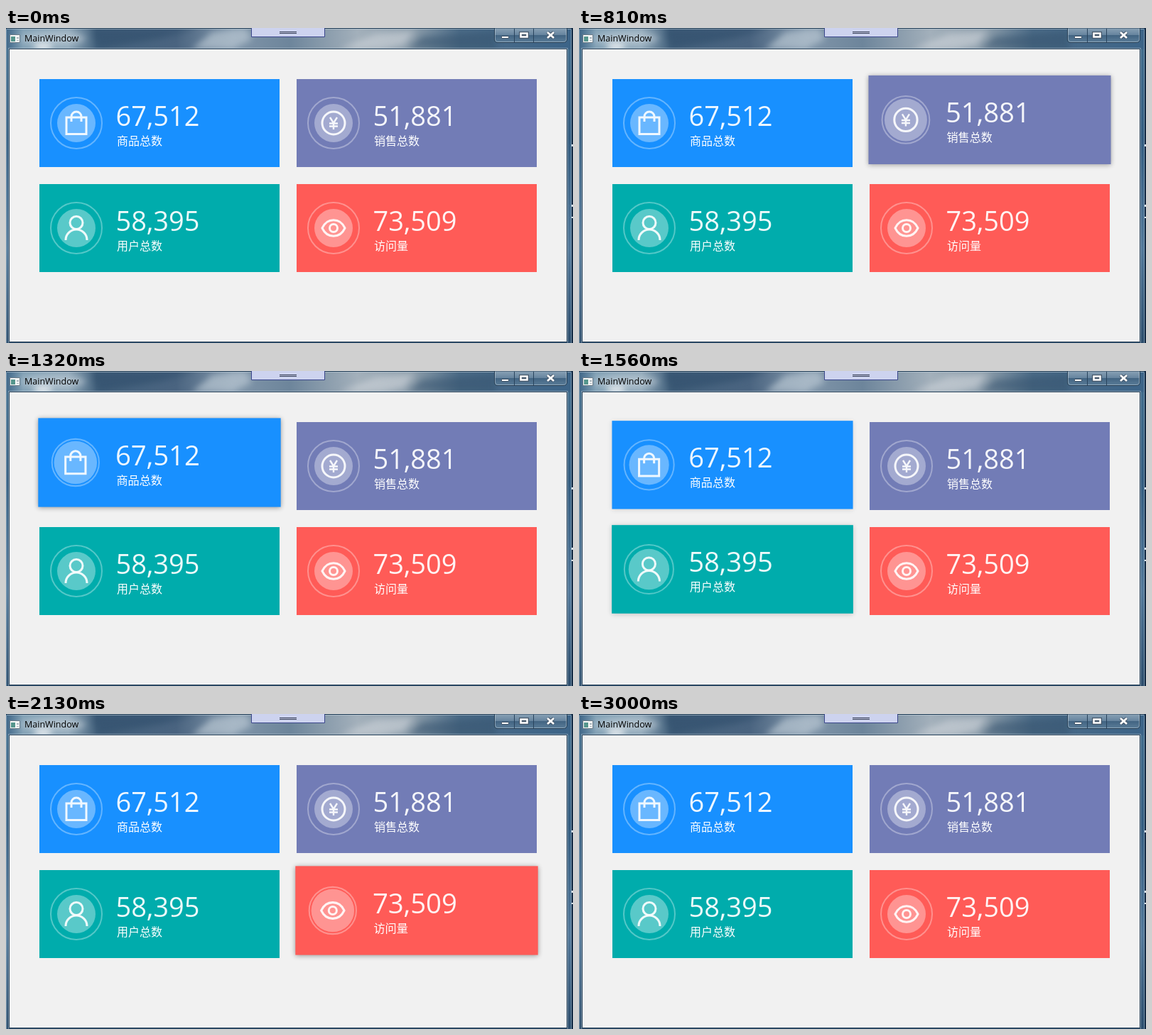
An HTML page for the animation above (4.35 s loop, 798x444 px).

```html
<!DOCTYPE html>
<html lang="zh-CN">
<head>
<meta charset="utf-8">
<title>MainWindow</title>
<style>
html, body { margin: 0; width: 100%; height: 100%; overflow: hidden; background: #f1f1f1 }
svg { display: block }
.title { font: 12.5px "Open Sans", "Noto Sans", sans-serif }
.num { font: 38px "Open Sans", "Noto Sans", sans-serif; fill: #fff; fill-opacity: .93 }
.label { font: 16px "Noto Sans CJK SC", "Noto Sans CJK", sans-serif; fill: #fff }
.icon { fill: none; stroke: #fff; stroke-opacity: .9; stroke-width: 3 }
.soft { filter: blur(5px) }
.shadow { filter: blur(3.5px) }
</style>
</head>
<body>
<svg id="stage" width="798" height="444" viewBox="0 0 798 444">
  <defs>
    <linearGradient id="bar">
      <stop offset="0" stop-color="#3f6688"/>
      <stop offset=".03" stop-color="#83a2b6"/>
      <stop offset=".11" stop-color="#91a9ba"/>
      <stop offset=".16" stop-color="#45637e"/>
      <stop offset=".3" stop-color="#4a6480"/>
      <stop offset=".4" stop-color="#8196aa"/>
      <stop offset=".5" stop-color="#6d859b"/>
      <stop offset=".62" stop-color="#a3b0bb"/>
      <stop offset=".72" stop-color="#8b9caa"/>
      <stop offset=".8" stop-color="#4c6c88"/>
      <stop offset="1" stop-color="#3c6488"/>
    </linearGradient>
    <linearGradient id="side" x2="0" y2="1">
      <stop offset="0" stop-color="#44708f"/>
      <stop offset=".35" stop-color="#345d80"/>
      <stop offset=".7" stop-color="#53799a"/>
      <stop offset="1" stop-color="#2c4d6c"/>
    </linearGradient>
    <linearGradient id="button" x2="0" y2="1">
      <stop offset="0" stop-color="#8aa2b6"/>
      <stop offset=".48" stop-color="#66849e"/>
      <stop offset=".5" stop-color="#426482"/>
      <stop offset="1" stop-color="#5b7d99"/>
    </linearGradient>
    <clipPath id="barClip"><path d="M0 0H798V30H0Z"/></clipPath>
  </defs>

  <path fill="url(#side)" d="M0 0H798V444H0Z"/>
  <path fill="url(#bar)" d="M0 0H798V30H0Z"/>
  <g clip-path="url(#barClip)">
    <g class="soft">
      <ellipse cx="66" cy="15" rx="46" ry="9" fill="#c3d0d9" opacity=".65"/>
      <ellipse cx="52" cy="27" rx="13" ry="5" fill="#fff" opacity=".8"/>
      <path d="M262 30L290 6L338 0L346 16L318 30Z" fill="#b8c6d2" opacity=".7"/>
      <path d="M470 30L520 8L575 4L560 24L530 30Z" fill="#cbd2d8" opacity=".65"/>
      <path d="M120 0H270L220 14L130 30Z" fill="#304e6c" opacity=".6"/>
      <path d="M585 12L690 4V30H565Z" fill="#35526e" opacity=".55"/>
    </g>
    <path d="M0 .5H796" stroke="#233d55"/>
    <path d="M1 1.5H795" stroke="#b6c8d6" stroke-opacity=".6"/>
  </g>

  <path d="M796 0H798V444H796Z" fill="#142b45"/>
  <path d="M795.5 2V444M.5 2V444" stroke="#9bb6ca" stroke-opacity=".65"/>
  <path d="M797 164V167M797 249V252M797 266V268" stroke="#dce6ee" stroke-width="2"/>
  <path d="M4.5 29.5H789.5V442.5H4.5Z" fill="#f1f1f1" stroke="#263f56"/>
  <path d="M3.5 443.5V28.5H790.5V443.5" fill="none" stroke="#b4c7d5" stroke-opacity=".55"/>

  <path d="M5.5 9.5H19.5V20.5H5.5Z" fill="#f5f7f7" stroke="#6c7c88"/>
  <path d="M7 12H13V19H7Z" fill="#55958c"/>
  <path d="M15 13H18V15H15ZM15 17H18V18H15Z" fill="#a9b5bd"/>
  <text class="title" x="26" y="19">MainWindow</text>

  <path d="M345.5-1V12.5H448.5V-1Z" fill="#cdd3ef" stroke="#3b478c"/>
  <path d="M385 5.5H409M385 7.5H409" stroke="#30384f"/>

  <path d="M687.5 0V16Q687.5 20.5 692 20.5H784Q789.5 20.5 789.5 16V0Z" fill="url(#button)" stroke="#263e55"/>
  <path d="M688.5 1V16Q688.5 19.5 692 19.5H784Q788.5 19.5 788.5 16V1" fill="none" stroke="#c6d5e0" stroke-opacity=".5"/>
  <path d="M715.5 1V20M742.5 1V20" stroke="#29435c"/>
  <path d="M697.5 11.5H707.5V14.5H697.5Z" fill="#fff" stroke="#45576a"/>
  <path d="M724.5 7.5H733.5V12.5H724.5Z" fill="none" stroke="#45576a" stroke-width="5"/>
  <path d="M724.5 7.5H733.5V12.5H724.5Z" fill="none" stroke="#fff" stroke-width="2.5"/>
  <path d="M762 6L771 14M771 6L762 14" stroke="#45576a" stroke-width="5"/>
  <path d="M762 6L771 14M771 6L762 14" stroke="#fff" stroke-width="2.8"/>

  <g id="cards"></g>
</svg>
<script>
const LOOP = 4350, LIFT = 5, GROW = .01;

// up and down: [start, end] of each hover transition in ms
const cards = [
  { x: 47, y: 72, color: '#1890ff', num: '67,512', label: '商品总数',
    up: [1140, 1320], down: [1440, 1620],
    icon: '<path d="M-14-8H14V15.5H-14ZM-7-2V-9A7 7 0 0 1 7-9V-2"/>' },
  { x: 409, y: 72, color: '#727cb6', num: '51,881', label: '销售总数',
    up: [610, 830], down: [1080, 1260],
    icon: '<circle r="16"/><path stroke-width="2.4" d="M-5-8L0 0L5-8M0 0V9M-6 .5H6M-6 4.5H6"/>' },
  { x: 47, y: 220, color: '#00acac', num: '58,395', label: '用户总数',
    up: [1470, 1650], down: [1920, 2100],
    icon: '<circle cy="-7.5" r="9"/><path d="M-15 17A15 15 0 0 1 15 17"/>' },
  { x: 409, y: 220, color: '#ff5b57', num: '73,509', label: '访问量',
    up: [1950, 2130], down: [2820, 3000],
    icon: '<path d="M-16 0C-9-15 9-15 16 0C9 15-9 15-16 0Z"/><circle r="5.5"/>' }
];

const root = document.getElementById('cards');
root.innerHTML = cards.map(c => `<g>
  <rect class="shadow" x="-169" y="-61" width="338" height="124"/>
  <rect x="-169" y="-62" width="338" height="124" fill="${c.color}"/>
  <g transform="translate(-117)">
    <circle class="ring" fill="none" stroke="#fff" stroke-opacity=".33" stroke-width="2"/>
    <circle class="disc" fill="#fff" fill-opacity=".35"/>
    <g class="icon">${c.icon}</g>
  </g>
  <text class="num" x="-61.5" y="3.5">${c.num}</text>
  <text class="label" x="-60" y="30.5">${c.label}</text>
</g>`).join('');

cards.forEach((c, i) => {
  c.el = root.children[i];
  for (const part of ['shadow', 'ring', 'disc']) c[part] = c.el.querySelector('.' + part);
});

const progress = (t, [from, to]) => Math.min(1, Math.max(0, (t - from) / (to - from)));

function draw(now) {
  const t = now % LOOP;
  for (const c of cards) {
    const p = progress(t, c.up) - progress(t, c.down);
    c.el.setAttribute('transform',
      `translate(${c.x + 169} ${c.y + 62 - LIFT * p}) scale(${1 + GROW * p})`);
    c.shadow.setAttribute('opacity', .38 * p);
    c.ring.setAttribute('r', 36 - 3.2 * p);
    c.disc.setAttribute('r', 27 + 3 * p);
  }
  requestAnimationFrame(draw);
}
draw(performance.now());
</script>
</body>
</html>
```
